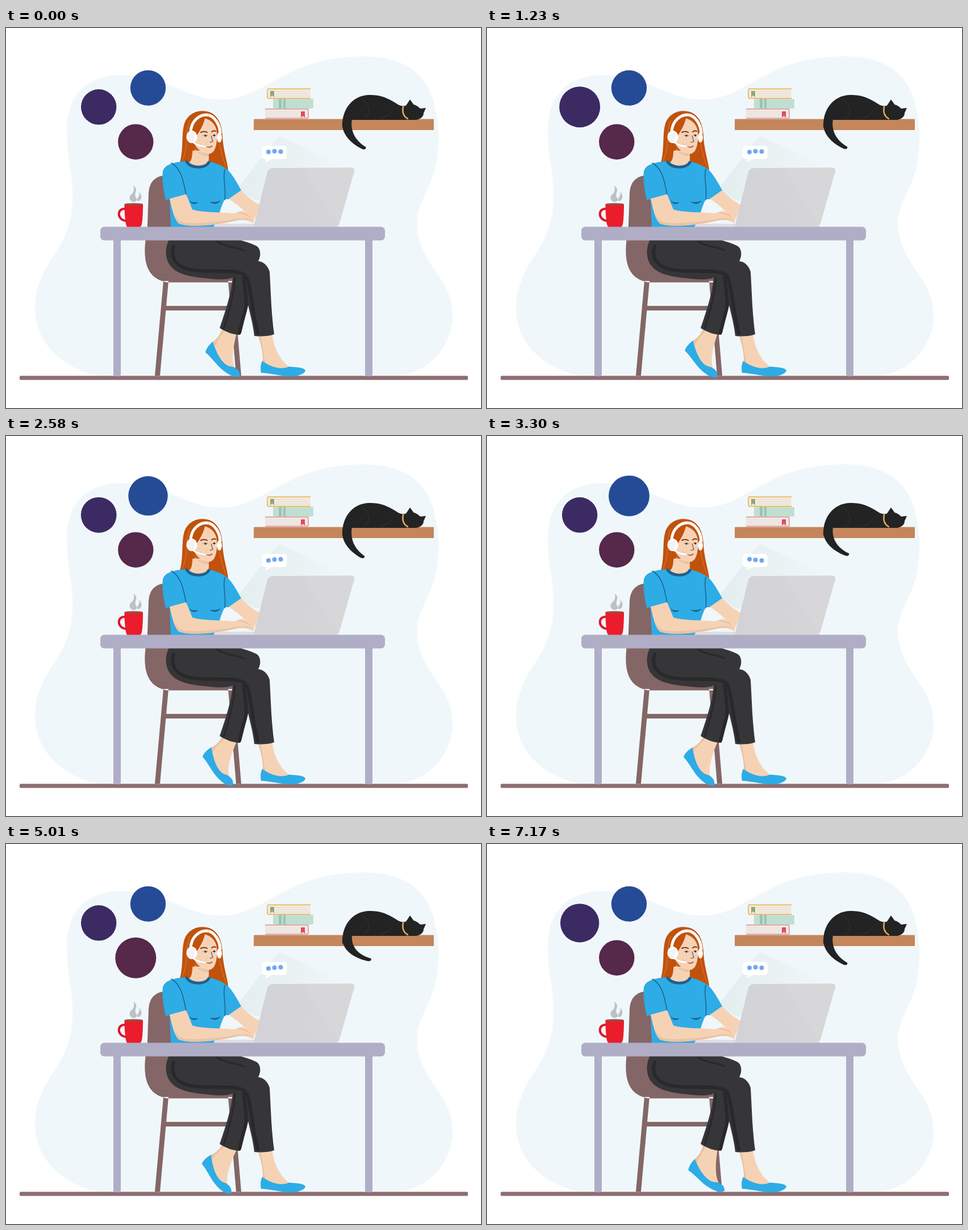
Recreate the animation shown at these times as an HTML page. Size 836 by 670 pixels, loop 7200 ms.

```html
<!DOCTYPE html>
<html lang="en">
<head>
<meta charset="utf-8">
<title>Working from home</title>
<style>
  html, body { margin: 0; width: 100%; height: 100%; overflow: hidden; background: #fff; }
  svg { display: block; width: 100vw; height: 100vh; }
  .line { fill: none; stroke-linecap: round; stroke-linejoin: round; }
  .skin { fill: #f6d2b5; }
  .shade { fill: #e9c3a3; }
  .blue { fill: #2dace6; }
  .wood { fill: #846667; }
  .table { fill: #b0adc6; }
</style>
</head>
<body>
<svg viewBox="0 0 836 670">
  <defs>
    <linearGradient id="beam" gradientUnits="userSpaceOnUse" x1="420" y1="235" x2="590" y2="250">
      <stop offset="0" stop-color="#e4eef0"/>
      <stop offset=".55" stop-color="#eaf2f4"/>
      <stop offset="1" stop-color="#f0f7fa"/>
    </linearGradient>
    <linearGradient id="lid" x1="0" y1="0" x2="1" y2="0">
      <stop offset="0" stop-color="#d3d2d6"/>
      <stop offset="1" stop-color="#d6d6d8"/>
    </linearGradient>
  </defs>

  <path fill="#f0f7fb" d="M165 613C100 602 51 555 51 495C51 457 66 428 84 401C106 368 118 338 117 292C117 255 107 225 107 182C107 125 135 83 205 83C288 84 312 126 380 126C458 126 488 50 630 50C709 50 745 88 755 140C764 180 764 225 750 265C738 298 722 318 723 348C725 389 749 417 767 445C783 471 786 490 786 515C781 565 743 607 690 613Z"/>

  <g id="badges">
    <circle cx="163.2" cy="139.3" r="31.2" fill="#3c2a63"/>
    <circle cx="250" cy="105.6" r="31.2" fill="#264b96"/>
    <circle cx="228.3" cy="200.7" r="31.2" fill="#56284a"/>
  </g>

  <!-- shelf and books -->
  <rect x="436" y="160.500" width="317" height="19.500" rx="1" fill="#c4865a"/>
  <path fill="#f1e9e4" stroke="#e3a3ac" stroke-width="2" d="M456 142.700H530Q532 142.700 532 145V157Q532 159.300 530 159.300H456"/>
  <path fill="#f2ebdf" stroke="#f0bd70" stroke-width="2" d="M536 107.200H462Q460 107.200 460 110V121Q460 124 462 124H536"/>
  <path class="line" stroke="#e4dbd3" d="M458 148h58M458 152h58M458 156h58M475 112h60M475 116h60M475 120h60"/>
  <rect x="470" y="125" width="71" height="17" rx="2" fill="#bfdfd0"/>
  <path fill="#9cc4b2" d="M480 125h5v17h-5zM488 125h4v17h-4z"/>
  <path fill="#dd4b5c" d="M519 147h7v11l-3.500-3-3.500 3z"/>
  <path fill="#8fa878" d="M465 111h7v11l-3.500-3-3.500 3z"/>

  <!-- cat -->
  <path id="tail" fill="#232323"/>
  <path fill="#232323" d="M592 176C590 150 605 118 641 118C666 118 680 129 692 136C698 138 702 138 704.500 136L711 126L717.500 135C722 136 726 139 729 142L739 141L735 150C735 157 729 161 721 162H606Z"/>
  <path class="line" stroke="#373737" d="M630 160C640 155 643 138 630 128M660 159C670 157 677 152 679 146"/>
  <path class="line" stroke="#e6b160" stroke-width="2.500" d="M699 139C697 149 700 156 707 160"/>

  <!-- laptop light and speech bubble -->
  <path fill="url(#beam)" d="M480 190L600 246L590 262L440 304L405 286Z"/>
  <path fill="#fff" d="M456 208H488Q494 208 494 214V225Q494 231 488 231H468L457 237L458 231H456Q450 231 450 225V214Q450 208 456 208Z"/>
  <g id="dots" fill="#74a6ee"><circle cx="462" r="4"/><circle cx="472.500" r="4"/><circle cx="483.500" r="4"/></g>

  <!-- chair -->
  <path class="wood" d="M248 374L251 291C252 272 262 262 278 260L310 262V374Z"/>
  <path class="wood" d="M246 370C242 402 243 438 278 447Q281 448.500 290 448.500H402V370ZM277 446H286L271 613H262ZM391 446H400L414 613H405ZM280 490H396V498H280Z"/>

  <rect x="24" y="613.300" width="789" height="7.200" rx="2" fill="#8d6f71"/>

  <!-- feet -->
  <g id="foot">
    <path class="skin" d="M381 528C377 540 372 548 363 554L377 586C386 596 394 599 403 600C396 586 400 560 407 534Z"/>
    <path class="shade" d="M381 530C377 541 372 548 363 554L367 562C371 552 377 545 385 534Z"/>
    <path class="blue" d="M364 553C356 560 352 566 351 572C361 580 370 593 380 602C392 612 402 617 411 614C413 607 408 600 398 597C383 597 371 576 364 553Z"/>
  </g>
  <path class="skin" d="M443 538H468C472 565 481 584 499 598C488 607 466 600 452 589C453 570 447 555 443 538Z"/>
  <path class="shade" d="M443 538H447C452 560 453 578 457 592L452 589C453 570 447 555 443 538Z"/>
  <path class="blue" d="M451 587C447 595 448 603 449 608C465 608 480 614 502 614C514 614 525 610 527 604C525 599 514 598 498 597C481 604 464 596 451 587Z"/>

  <!-- trousers -->
  <path fill="#363537" d="M289 370C278 387 280 409 290 420C304 438 338 440 370 443C386 444 394 442 399 440C396 472 385 502 376 529C387 536 400 541 412 541C416 521 423 508 426 488C430 506 435 524 437 543C449 544 461 544 472 540C467 506 466 464 464 430C461 419 453 412 444 411C450 400 448 386 438 383C426 377 414 376 405 370Z"/>
  <path class="line" stroke="#29282a" stroke-width="6" d="M295 385C288 407 302 424 332 427C366 431 406 425 420 435C431 447 430 484 443 538"/>
  <path class="line" stroke="#29282a" stroke-width="3" d="M372 376C383 386 404 385 418 392M403 440C401 473 391 504 383 530"/>
  <path class="line" stroke="#29282a" stroke-width="6" d="M418 440C422 460 422 480 423 489L411 537"/>

  <!-- hair, face and headset -->
  <path fill="#c1520d" d="M306 237C313 212 308 188 314 168C321 148 343 142 360 149C375 156 380 173 381 190C382 216 390 236 391 251L355 240Z"/>
  <path class="skin" d="M328 216H357V237C350 247 326 246 322 237Q328 234 328 216Z"/>
  <path class="shade" d="M331 211C338 219 348 222 357 220V226C346 226 336 220 331 211Z"/>
  <path class="skin" d="M331 183C341 178 347 168 349 159C361 162 370 170 371 184C372 201 370 221 357 222C345 221 332 211 331 200Z"/>
  <path fill="#c1520d" d="M351 155C348 174 337 186 331 198C330 214 327 227 322 236H307C318 214 310 179 322 160C331 149 344 148 351 155Z"/>
  <path class="line" stroke="#e08845" stroke-width=".8" d="M323 163C314 190 322 211 310 234M376 204C379 220 383 234 387 244"/>
  <path class="line" stroke="#fff" stroke-width="5" d="M325 185C325 163 341 153 353 153C367 154 376 170 377 185"/>
  <ellipse cx="327" cy="192" rx="9.500" ry="11" fill="#fff"/>
  <ellipse cx="325.500" cy="192" rx="6.500" ry="9" fill="#f4f4f6"/>
  <ellipse cx="375.500" cy="193" rx="4.500" ry="9" fill="#fff"/>
  <path class="line" stroke="#fff" stroke-width="2.500" d="M330 202C336 207 343 208 350 209"/>
  <path class="line" stroke="#7d3511" stroke-width="2" d="M343 184Q349 181 354 184M362 183Q366 180 369 182"/>
  <path class="line" stroke="#5d4038" stroke-width=".8" d="M347 190Q351 187 355 190M364 189Q366.500 187 369 189"/>
  <circle cx="351" cy="190" r="1.800" fill="#493a3d"/><circle cx="366.500" cy="189.500" r="1.800" fill="#493a3d"/>
  <path class="line" stroke="#3f3431" d="M361 190L364 200L359 201.500"/>
  <path class="line" stroke="#8f302c" stroke-width="1.300" d="M354 209.500Q359 211.500 363 208"/>

  <!-- shirt and arms -->
  <path class="skin" d="M389 300C403 307 413 317 419 322L438 337L447 312C432 304 420 294 413 284Z"/>
  <path class="blue" d="M316 235C300 236 279 239 276 253C274 269 278 288 281 303L288 302L290 351H372C373 331 378 316 385 302L391 302L414 286C406 272 398 257 389 249C378 241 368 238 357 235C350 247 325 247 316 235Z"/>
  <path class="line" stroke="#20608a" stroke-width="5" d="M318 236C326 248 350 248 357 237"/>
  <path class="line" stroke="#20608a" stroke-width="1.500" d="M291 238C309 248 313 273 317 294M385 249C381 266 388 282 385 303"/>
  <path fill="#20608a" d="M322 304Q329 309 339 307Q330 315 322 304ZM358 306Q368 309 378 304Q369 315 358 306Z"/>
  <path fill="#dedee5" d="M368 345H585V351H365Z"/>
  <path class="skin" d="M288 301C293 323 297 340 305 345C323 352 370 348 403 340C420 336 428 341 435 344C440 336 433 327 421 323C412 321 406 325 400 327C375 324 347 326 328 320L317 293Z"/>
  <path class="shade" d="M296 325C301 344 315 345 336 344C361 343 383 341 404 337C418 334 427 336 435 339C424 338 416 337 403 340C370 348 323 352 305 345C299 341 297 334 296 325Z"/>
  <path class="line" stroke="#dba985" d="M410 326Q421 326 429 333"/>
  <path fill="url(#lid)" d="M470 247L606 246Q614 246 613 253L587 344Q585 350 578 350H436L460 254Q462 247 470 247Z"/>
  <path fill="#dddcdf" opacity=".2" d="M522 247L606 246Q614 246 613 253L584 349Z"/>

  <!-- mug -->
  <path id="steam" fill="#bcc1c6" d="M224 278C236 286 222 291 230 301Q231 306 224 307C215 304 216 296 222 292Q227 286 224 278ZM234 289C240 294 240 301 234 305Q228 306 232 299Q236 295 234 289Z"/>
  <path class="line" stroke="#dc1728" stroke-width="4" d="M211 319C195 316 194 339 212 340"/>
  <path fill="#eb1c2b" d="M208.500 311H241C241 325 240.500 337 239 346Q237 353.500 230 353.500H219Q213 353.500 211 346C209.500 337 208.500 325 208.500 311Z"/>
  <ellipse cx="224.700" cy="310.700" rx="16.300" ry="2" fill="#985044"/>

  <!-- table -->
  <path class="table" d="M189 370H202V610Q202 614 198 614H193Q189 614 189 610ZM632 370H645V610Q645 614 641 614H636Q632 614 632 610Z"/>
  <rect class="table" x="166" y="350.500" width="501" height="24" rx="7"/>
</svg>
<script>
const LOOP = 7200;
const byId = id => document.getElementById(id);
const badges = byId('badges').children;
const dots = byId('dots').children;

const smooth = x => {
  x = Math.max(0, Math.min(1, x));
  return x * x * (3 - 2 * x);
};

// Eased value through [time, value] pairs.
function track(keys, t) {
  const i = Math.max(1, keys.findIndex(key => key[0] >= t));
  const [t0, a] = keys[i - 1], [t1, b] = keys[i];
  return a + (b - a) * smooth((t - t0) / (t1 - t0));
}

const pulse = p => smooth(p / 1050) - smooth((p - 1350) / 1400);
const pulseStarts = [[0, 5230], [1880], [3760]];
const footAngle = [[0, 0], [1230, 4.4], [2580, 8.8], [4020, 8], [5010, 11], [6270, -2.2], [7200, -5]];
const tailAngle = [[0, 0], [1230, -1], [2580, 3], [4020, -12.4], [5010, -12.4], [6270, -11.5], [7200, -1]];

// A tapering tail whose bend grows from root to tip.
function tailPath(angle) {
  const bend = (x, y, share) => {
    const a = angle * share * Math.PI / 180, dx = x - 600, dy = y - 165;
    return `${600 + dx * Math.cos(a) - dy * Math.sin(a)} ${165 + dx * Math.sin(a) + dy * Math.cos(a)}`;
  };
  return `M592 168C${bend(591, 185, .3)} ${bend(604, 202, .8)} ${bend(627, 213.5, 1)}`
    + `Q${bend(634, 215.5, 1)} ${bend(633.5, 210, 1)}`
    + `C${bend(617, 200, .8)} ${bend(605, 184, .4)} 609 160Z`;
}

function draw(t) {
  pulseStarts.forEach((starts, i) => {
    const growth = starts.reduce((sum, start) => sum + pulse(t - start), 0);
    badges[i].setAttribute('r', 31.2 + 4.8 * growth);
  });
  [-.25, 0, .18].forEach((phase, i) => {
    dots[i].setAttribute('cy', 218.5 - 1.2 * Math.cos(2 * Math.PI * (t / 1200 - phase)));
  });
  byId('foot').setAttribute('transform', `rotate(${track(footAngle, t)} 390 535)`);
  byId('tail').setAttribute('d', tailPath(track(tailAngle, t)));
  byId('steam').setAttribute('transform', `rotate(${1.5 * Math.sin(2 * Math.PI * t / 2400)} 228 308)`);
}

const start = performance.now();
function frame(now) {
  draw(Math.max(0, now - start) % LOOP);
  requestAnimationFrame(frame);
}
draw(0);
requestAnimationFrame(frame);
</script>
</body>
</html>
```
